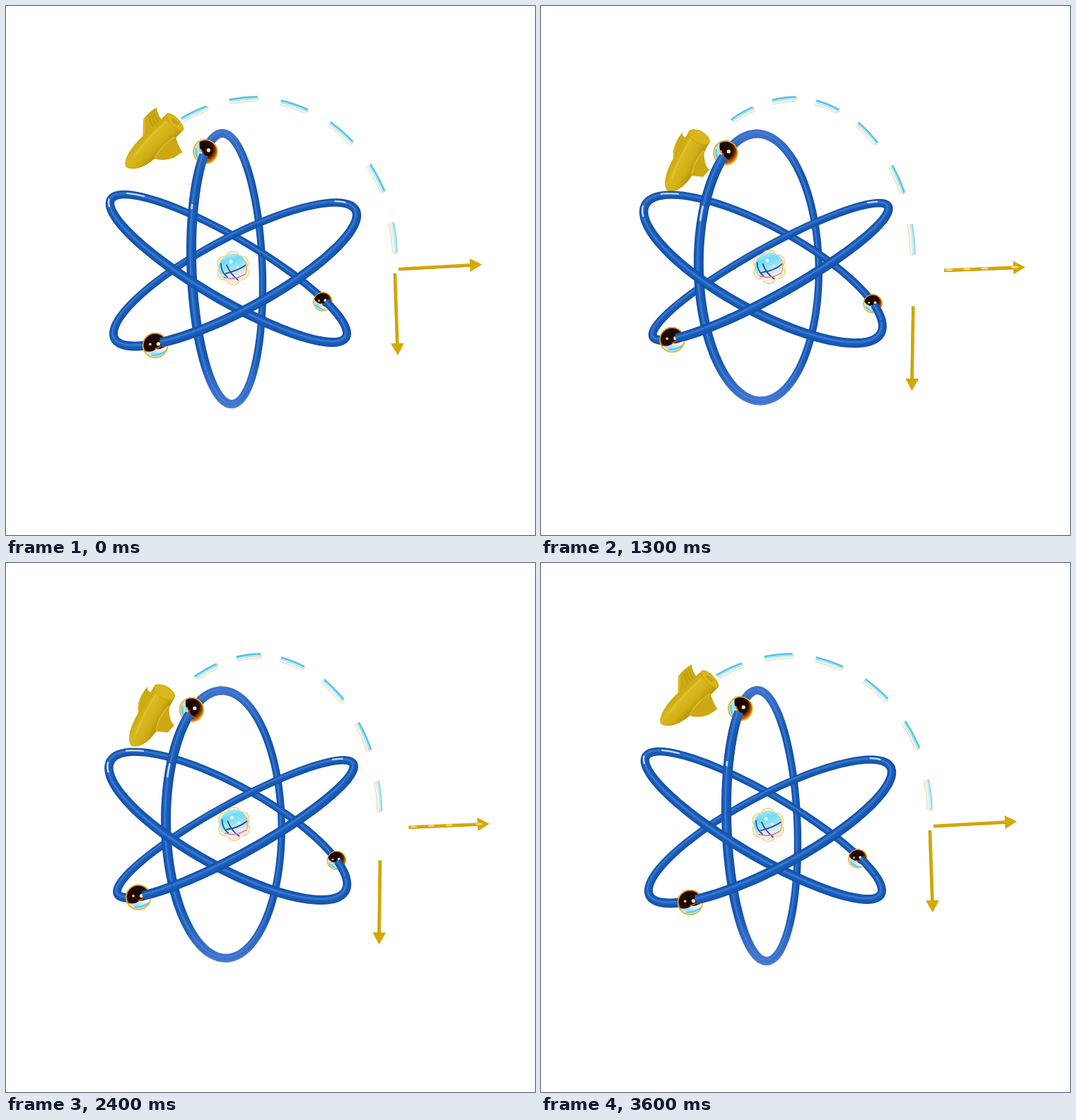
Recreate the animation shown at these times as an HTML page. Size 748 by 748 pixels, loop 3700 ms.

```html
<!DOCTYPE html>
<html lang="en">
<head>
<meta charset="utf-8">
<title>Atom and rocket</title>
<style>
  html, body { margin: 0; width: 100%; height: 100%; overflow: hidden; background: #fff; }
  svg { display: block; width: 100vw; height: 100vh; }
</style>
</head>
<body>
<svg viewBox="0 0 748 748" xmlns="http://www.w3.org/2000/svg">
  <defs>
    <linearGradient id="edge" gradientUnits="userSpaceOnUse" x1="0" y1="174" x2="0" y2="568">
      <stop offset="0" stop-color="#4a74c8"/><stop offset=".16" stop-color="#164f9f"/>
      <stop offset=".82" stop-color="#1650a4"/><stop offset="1" stop-color="#5a82d2"/>
    </linearGradient>
    <linearGradient id="tube" gradientUnits="userSpaceOnUse" x1="0" y1="174" x2="0" y2="568">
      <stop offset="0" stop-color="#4574cc"/><stop offset=".16" stop-color="#1558b2"/>
      <stop offset=".82" stop-color="#1559b6"/><stop offset="1" stop-color="#4a78d0"/>
    </linearGradient>
    <radialGradient id="dark" cx=".42" cy=".38" r=".62">
      <stop offset="0" stop-color="#120300"/><stop offset=".6" stop-color="#260900"/>
      <stop offset=".8" stop-color="#9a3f06"/><stop offset="1" stop-color="#eba61c"/>
    </radialGradient>
    <linearGradient id="glass" x1="0" y1="0" x2=".4" y2="1">
      <stop offset="0" stop-color="#fff3dc"/><stop offset=".35" stop-color="#f6f4fb"/>
      <stop offset=".7" stop-color="#9fe2f5"/><stop offset="1" stop-color="#ffe2c4"/>
    </linearGradient>
    <linearGradient id="core" x1=".3" y1="0" x2=".6" y2="1">
      <stop offset="0" stop-color="#b4f0fa"/><stop offset=".25" stop-color="#6edbf4"/>
      <stop offset=".55" stop-color="#a4e6f6"/><stop offset=".8" stop-color="#f4ecf6"/>
      <stop offset="1" stop-color="#fff3dc"/>
    </linearGradient>
    <linearGradient id="hull" x1="0" y1="0" x2="0" y2="1">
      <stop offset="0" stop-color="#cba810"/><stop offset=".35" stop-color="#d9b920"/>
      <stop offset=".7" stop-color="#d0ad14"/><stop offset="1" stop-color="#b6920c"/>
    </linearGradient>
  </defs>
  <g id="scene"></g>
</svg>
<script>
const scene = document.getElementById('scene');
const LOOP = 3700, STEP = 100, HALF = 1800, TAU = Math.PI * 2;

// Each part has a pose at swing 0, 0.5 and 0.933; a parabola joins them.
const KNOTS = [0, 0.5, 0.933];
const RINGS = {
  tall:  [[312.5, 371.5, 50.5, 191.5, .13], [308.5, 370, 71, 190, .055], [308, 369.5, 90, 188.5, .025]],
  fall:  [[314.5, 371, 167.5, 104.5, .878], [313.5, 371.5, 167.5, 104.5, .822], [314.5, 372, 169.5, 105, .751]],
  rise:  [[324, 379.5, 172, 101.5, -.825], [324, 377.5, 169, 98.5, -.88], [325, 374.8, 166, 96.5, -.932]]
};
const ELECTRONS = {
  tall: [[282, 206, 17.5], [268, 207, 17.5], [259, 208, 17.5]],
  fall: [[448, 418, 13.5], [461, 419, 13.5], [472, 422, 13.5]],
  rise: [[211, 480, 18], [194, 475, 18], [183, 471, 18]]
};
const ARROWS = [
  [[555, 372, 673, 365.5], [566, 373, 680, 367.5], [571, 374.2, 686.5, 370]],
  [[550, 378, 554, 494], [537.5, 406, 537.5, 524], [522, 431, 519.5, 551]]
];
// nose x, y, tail x, y, cap depth, upper fin height, lower fin height and reach
const ROCKET = [
  [172, 229, 239, 164, 6, 34, 38, 71],
  [176, 250, 227, 174, 8.5, 28, 37, 60],
  [184, 266, 223, 190, 9, 23, 34, 57]
];
const DASHES = [
  [249, 161, 285, 144], [316, 135, 356, 131], [388, 136, 426, 149],
  [457, 166, 489, 194], [513, 225, 533, 263], [545, 306, 550, 349]
];

const fix = v => v.toFixed(2);
const path = (d, attrs) => `<path d="${d}" ${attrs}/>`;

function blend(poses, p) {
  const [a, b, c] = KNOTS;
  const wa = (p - b) * (p - c) / ((a - b) * (a - c));
  const wb = (p - a) * (p - c) / ((b - a) * (b - c));
  const wc = (p - a) * (p - b) / ((c - a) * (c - b));
  return poses[0].map((v, i) => v * wa + poses[1][i] * wb + poses[2][i] * wc);
}

function makeRing(poses, p) {
  const [cx, cy, w, h, lean] = blend(poses, p);
  const phase = Math.acos(lean);
  const end = Math.atan2(h * h * Math.sin(2 * phase), w * w + h * h * Math.cos(2 * phase)) / 2;
  const at = t => [cx + w * Math.cos(t), cy + h * Math.cos(t - phase)];
  const normal = t => {
    const dx = -w * Math.sin(t), dy = -h * Math.sin(t - phase), n = Math.hypot(dx, dy);
    return [-dy / n, dx / n];
  };
  const radius = t => 6.1 + .9 * Math.sin(t - end);
  const nearest = (x, y) => {
    let best = 0, least = Infinity;
    for (let t = 0; t < TAU; t += .01) {
      const [px, py] = at(t), d = Math.hypot(px - x, py - y);
      if (d < least) { least = d; best = t; }
    }
    return best;
  };
  return { at, normal, radius, nearest, end };
}

// Filled strip along a ring from angle a to angle b.
function strip(ring, a, b, scale, shift, attrs) {
  const n = Math.max(6, Math.ceil((b - a) * 22)), one = [], two = [];
  for (let i = 0; i <= n; i++) {
    const t = a + (b - a) * i / n, [x, y] = ring.at(t), [u, v] = ring.normal(t);
    const r = ring.radius(t) * scale;
    one.push(fix(x + u * r - shift) + ' ' + fix(y + v * r - shift));
    two.unshift(fix(x - u * r - shift) + ' ' + fix(y - v * r - shift));
  }
  return path('M' + one.concat(two).join('L') + 'Z', attrs);
}

const tube = (ring, a, b) =>
  strip(ring, a, b, 1, 0, 'fill="url(#edge)"') +
  strip(ring, a, b, .78, .3, 'fill="url(#tube)"') +
  strip(ring, a, b, .4, 1, 'fill="#2e70cc" opacity=".45"') +
  strip(ring, a, b, .14, 1.5, 'fill="#5c94e2" opacity=".5"');

const backHalf = ring => tube(ring, ring.end - Math.PI - .02, ring.end + .02);
const frontHalf = ring => tube(ring, ring.end - .01, ring.end + Math.PI + .01);
const glint = (ring, from, to) =>
  strip(ring, from * TAU / 360, to * TAU / 360, .2, 2, 'fill="#fff" opacity=".72"');

function electron([x, y, r], facing) {
  return `<g transform="translate(${fix(x)} ${fix(y)}) scale(${fix(r)})">
    <circle r="1" fill="url(#dark)"/>
    <g transform="rotate(${facing})">
      <path d="M.2-.98A1 1 0 0 1 .2 .98Q.5 .4 .28 0Q.46-.45 .2-.98Z" fill="url(#glass)"/>
      <path d="M.62-.72Q.86-.2 .66 .5" fill="none" stroke="#55c9ec" stroke-width=".13"/>
      <path d="M-.25-.8Q.3-.55 .24 .1" fill="none" stroke="#c9580c" stroke-width=".1"/>
    </g>
    <circle r=".96" fill="none" stroke="#e9b41c" stroke-width=".09"/>
    <circle cx=".25" cy="-.12" r=".15" fill="#ffedb4"/><circle cx="-.4" cy="-.1" r=".11" fill="#f2b653"/>
  </g>`;
}

function nucleus(p) {
  let rim = '';
  for (let i = 0; i < 6; i++) {
    const a = i * TAU / 6 + .5;
    rim += `<circle cx="${fix(13 * Math.cos(a))}" cy="${fix(13 * Math.sin(a))}" r="10.5" fill="#fffaf0" stroke="#efc75e" stroke-width="1.1"/>`;
  }
  return `<g transform="translate(${fix(321 + 2 * p)} ${fix(370.5 - 2 * p)})">${rim}
    <circle r="20.5" fill="url(#core)" stroke="#f6dfae" stroke-width=".8"/>
    <g fill="none" stroke-linecap="round">
      <path d="M-17-6Q-17 6-8 13" stroke="#1d5a9c" stroke-width="1.8"/>
      <path d="M-9-4Q-4 ${fix(8 + 2 * p)} 7 17" stroke="#27488f" stroke-width="1.8"/>
      <path d="M18-4Q8 ${fix(3 + 3 * p)}-11 8" stroke="#3d3f8d" stroke-width="1.8"/>
      <path d="M-13 13Q2 18 16 9" stroke="#e8779a" stroke-width="1.7"/>
      <path d="M18-9Q21 0 17 10" stroke="#f0b54f" stroke-width="1.5"/>
    </g>
    <circle cx="-3" cy="-9" r="2.5" fill="#fff" opacity=".85"/><circle cx="6" cy="-1" r="1.7" fill="#fff" opacity=".7"/></g>`;
}

function dash([x0, y0, x1, y1], index, p) {
  const q = p * (.83 + .26 * p);
  const place = (x, y) => [x + (390 - x) * .175 * q, y + .00012 * (x - 390) ** 2 * q];
  const [ax, ay] = place(x0, y0), [bx, by] = place(x1, y1);
  const len = Math.hypot(bx - ax, by - ay), u = (by - ay) / len, v = -(bx - ax) / len;
  const line = (off, color, width, opacity = 1) => {
    const mx = (ax + bx) / 2 + u * (off + 2), my = (ay + by) / 2 + v * (off + 2);
    return path(`M${fix(ax + u * off)} ${fix(ay + v * off)}Q${fix(mx)} ${fix(my)} ${fix(bx + u * off)} ${fix(by + v * off)}`,
      `fill="none" stroke="${color}" stroke-width="${width}" opacity="${opacity}"`);
  };
  const faint = index === 5 ? .5 : 1;
  return line(0, '#f1fafc', 8) + line(2.2, '#5fd0ec', 2.8, faint) + line(3.4, '#5b9fb4', .7, faint) +
    line(-.4, '#8edff0', 1, faint) + line(-3.6, '#f0cd95', 1, .9) +
    `<circle cx="${fix(bx)}" cy="${fix(by)}" r="2" fill="#f4cf8c" opacity=".6"/>`;
}

function arrow([x0, y0, x1, y1], shine) {
  const len = Math.hypot(x1 - x0, y1 - y0), angle = Math.atan2(y1 - y0, x1 - x0) * 360 / TAU;
  let spots = '';
  if (shine > 0) {
    for (const at of [.06, .28, .5, .87])
      spots += `<ellipse cx="${fix(len * at)}" cy="-.5" rx="5" ry="1.5" fill="#fff3c5" opacity="${fix(shine)}"/>`;
  }
  return `<g transform="translate(${fix(x0)} ${fix(y0)}) rotate(${fix(angle)})">
    <rect y="-2.3" width="${fix(len - 15)}" height="4.6" fill="#d5a805"/>
    <path d="M0 1.7H${fix(len - 16)}" stroke="#c39a04" stroke-width="1"/>
    <path d="M${fix(len)} 0L${fix(len - 17)}-9.5V9.5Z" fill="#d5a805"/>${spots}</g>`;
}

function rocket(p) {
  const [x0, y0, x1, y1, cap, up, down, reach] = blend(ROCKET, p);
  const len = Math.hypot(x1 - x0, y1 - y0), angle = Math.atan2(y1 - y0, x1 - x0) * 360 / TAU;
  const rib = i => path(`M${66 + i * 5}-16Q${68 + i * 5}-25 ${73 + i * 5} ${fix(2 - up)}`,
    `fill="none" stroke="#97790b" stroke-width=".8" opacity="${fix(Math.max(0, .6 - 2 * p))}"`);
  return `<g transform="translate(${fix(x0)} ${fix(y0)}) rotate(${fix(angle)}) scale(${fix(len / 93)} 1)">
    <path d="M43-14Q54-24 64 ${fix(-up)}Q77 ${fix(-up - 2)} 89 ${fix(1 - up)}Q82-24 82-14Z" fill="#ccaa14"/>
    <path d="M48-17Q58-24 66 ${fix(1 - up)}" fill="none" stroke="#dfbf2d" stroke-width="1.5"/>
    ${rib(0)}${rib(1)}${rib(2)}
    <path d="M0 0C-4-8 14-18 46-17.5L93-16.5A${fix(cap)} 16.5 0 0 1 93 16.5L46 17.5C18 18 4 9 0 0Z" fill="url(#hull)"/>
    <path d="M20-6Q40-10 84-9" fill="none" stroke="#ebcd46" stroke-width="3" opacity=".45" stroke-linecap="round"/>
    <ellipse cx="93" rx="${fix(cap)}" ry="16" fill="#d9b61b" stroke="#c9a40f" stroke-width="1"/>
    <ellipse cx="93.5" rx="${fix(cap * .45)}" ry="6" fill="#bf9b10" opacity="${fix(Math.max(0, .7 - 2 * p))}"/>
    <path d="M36 16Q42 29 ${fix(reach - 14)} ${fix(down - 3)}L${fix(reach)} ${fix(down)}Q${fix(reach + 3)} 24 80 15Q58 10 36 16Z" fill="#cba814"/>
    <path d="M39 16Q58 10 78 15" fill="none" stroke="#dfbf2d" stroke-width="1.5"/>
  </g>`;
}

function render(time) {
  const p = (1 - Math.cos(Math.PI * time / HALF)) / 2;
  const ring = {}, ball = {}, angle = {};
  for (const name in RINGS) {
    ring[name] = makeRing(RINGS[name], p);
    ball[name] = blend(ELECTRONS[name], p);
    angle[name] = ring[name].nearest(ball[name][0], ball[name][1]);
  }
  const { tall, fall, rise } = ring;
  const shine = Math.max(0, Math.min(.75, (p - .55) * 3));
  scene.innerHTML =
    DASHES.map((d, i) => dash(d, i, p)).join('') +
    ARROWS.map((a, i) => arrow(blend(a, p), i ? 0 : shine)).join('') +
    rocket(p) +
    backHalf(tall) + backHalf(fall) + backHalf(rise) +
    glint(fall, 212, 226) + glint(rise, -34, -23) +
    nucleus(p) +
    frontHalf(tall) + frontHalf(fall) + frontHalf(rise) +
    glint(tall, 198, 215) + glint(fall, 173, 186) +
    electron(ball.fall, 120) + tube(fall, angle.fall + .02, angle.fall + .3) +
    electron(ball.tall, 165) + tube(tall, angle.tall - .55, angle.tall - .05) +
    electron(ball.rise, 75) + tube(rise, angle.rise - .4, angle.rise - .06);
}

let shown = -1;
function tick(now) {
  const time = Math.floor(now % LOOP / STEP) * STEP;
  if (time !== shown) render(shown = time);
  requestAnimationFrame(tick);
}
render(0);
requestAnimationFrame(tick);
</script>
</body>
</html>
```
